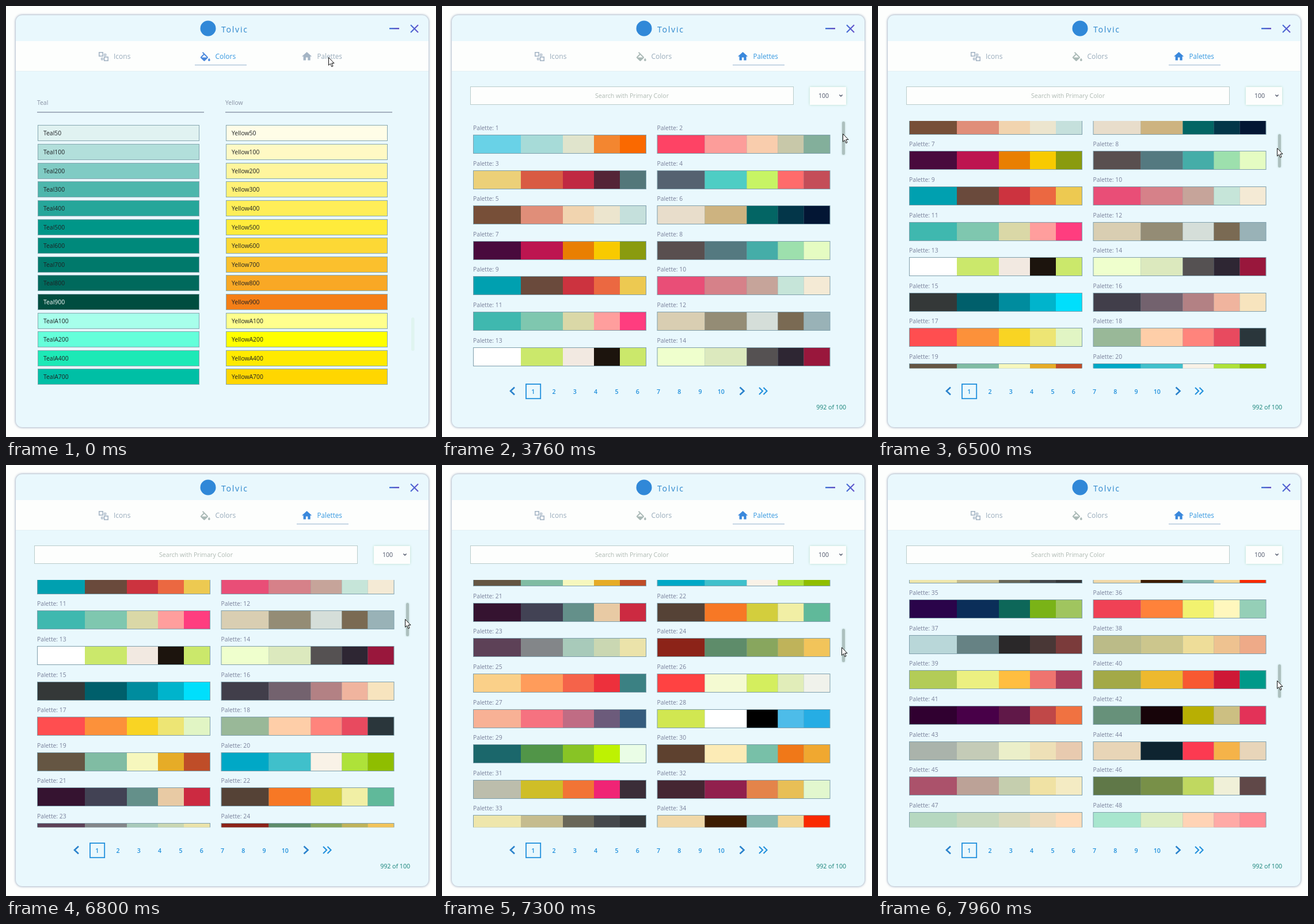
These frames come from a looping animation (747 by 750 pixels, 8000 ms). An HTML page with a canvas:

```html
<!DOCTYPE html>
<html lang="en">
<head>
<meta charset="utf-8">
<title>Palette browser</title>
<style>
html, body { margin: 0; width: 100%; height: 100%; overflow: hidden; background: #fdfefd; }
canvas { display: block; }
</style>
</head>
<body>
<canvas id="stage" width="747" height="750"></canvas>
<script>
const ctx = document.getElementById('stage').getContext('2d');
const LOOP = 8000, OPEN_AT = 760;
const FONT = '"Open Sans", "Noto Sans", sans-serif';
const BODY = '#e9f8fd', WHITE = '#fdfefd', BLUE = '#1f8fdc';
const ROW = 61.6, THUMB_RATIO = 7.12;

const teal = 'e0f2f1 b2dfdb 80cbc4 4db6ac 26a69a 009688 00897b 00796b 00695c 004d40 a7ffeb 64ffda 1de9b6 00bfa5'.split(' ');
const yellow = 'fffde7 fff9c4 fff59d fff176 ffee58 ffeb3b fdd835 fbc02d f9a825 f57f17 ffff8d ffff00 ffea00 ffd600'.split(' ');
const shades = ['50', '100', '200', '300', '400', '500', '600', '700', '800', '900', 'A100', 'A200', 'A400', 'A700'];

// Left column holds odd palettes, right column even ones.
const leftPalettes = [
  '69d2e7 a7dbd8 e0e4cc f38630 fa6900',
  'ecd078 d95b43 c02942 542437 53777a',
  '774f38 e08e79 f1d4af ece5ce c5e0dc',
  '490a3d bd1550 e97f02 f8ca00 8a9b0f',
  '00a0b0 6a4a3c cc333f eb6841 edc951',
  '3fb8af 7fc7af dad8a7 ff9e9d ff3d7f',
  'ffffff cbe86b f2e9e1 1c140d cbe86b',
  '343838 005f6b 008c9e 00b4cc 00dffc',
  'ff4e50 fc913a f9d423 ede574 e1f5c4',
  '655643 80bca3 f6f7bd e6ac27 bf4d28',
  '351330 424254 64908a e8caa4 cc2a41',
  '5d4157 838689 a8caba cad7b2 ebe3aa',
  'fad089 ff9c5b f5634a ed303c 3b8183',
  'f8b195 f67280 c06c84 6c5b7b 355c7d',
  '1b676b 519548 88c425 bef202 eafde6',
  'bcbdac cfbe27 f27435 f02475 3b2d38',
  'eee6ab c5bc8e 696758 45484b 36393b',
  '2a044a 0b2e59 0d6759 7ab317 a0c55f',
  'b9d7d9 668284 2a2829 493736 7b3b3b',
  'b3cc57 ecf081 ffbe40 ef746f ab3e5b',
  '300030 480048 601848 c04848 f07241',
  'aab3ab c4cbb7 ebefc9 eee0b7 e8caaf',
  'ab526b bca297 c5ceae f0e2a4 f4ebc3',
  'b6d8c0 c8d9bf dadabd ecdbbc fedcba'
];
const rightPalettes = [
  'fe4365 fc9d9a f9cdad c8c8a9 83af9b',
  '556270 4ecdc4 c7f464 ff6b6b c44d58',
  'e8ddcb cdb380 036564 033649 031634',
  '594f4f 547980 45ada8 9de0ad e5fcc2',
  'e94e77 d68189 c6a49a c6e5d9 f4ead5',
  'd9ceb2 948c75 d5ded9 7a6a53 99b2b7',
  'efffcd dce9be 555152 2e2633 99173c',
  '413e4a 73626e b38184 f0b49e f7e4be',
  '99b898 fecea8 ff847c e84a5f 2a363b',
  '00a8c6 40c0cb f9f2e7 aee239 8fbe00',
  '554236 f77825 d3ce3d f1efa5 60b99a',
  '8c2318 5e8c6a 88a65e bfb35a f2c45a',
  'ff4242 f4fad2 d4ee5e e1edb9 f0f2eb',
  'd1e751 ffffff 000000 4dbce9 26ade4',
  '5e412f fcebb6 78c0a8 f07818 f0a830',
  '452632 91204d e4844a e8bf56 e2f7ce',
  'f0d8a8 3d1c00 86b8b1 f2d694 fa2a00',
  'f04155 ff823a f2f26f fff7bd 95cfb7',
  'bbbb88 ccc68d eedd99 eec290 eeaa88',
  'a3a948 edb92e f85931 ce1836 009989',
  '67917a 170409 b8af03 ccbf82 e33258',
  'e8d5b7 0e2430 fc3a51 f5b349 e8d5b9',
  '607848 789048 c0d860 f0f0d8 604848',
  'a8e6ce dcedc2 ffd3b5 ffaaa6 ff8c94'
];
const edges = [0, 82, 155, 209, 254, 299];

// Keys: time, then values.
const pointer = [
  [0, 560, 89], [1150, 560, 89], [1380, 610, 150], [1610, 650, 208], [1760, 652, 209],
  [2080, 692, 220], [2290, 712, 228], [2530, 698, 226], [2570, 699, 226], [2610, 697, 226],
  [3379, 697, 226], [3380, 690, 226], [3609, 690, 226], [3610, 692, 226], [3759, 692, 226],
  [3760, 696, 222], [5069, 696, 222], [5260, 695, 233], [5759, 695, 233], [5760, 694, 235],
  [5920, 694, 241], [6149, 694, 241], [6300, 693, 246], [6499, 693, 246], [6500, 693, 247],
  [6770, 693, 265], [7030, 693, 288], [7570, 694, 346], [7960, 693, 375], [8000, 693, 375]
];
const scroll = [
  [0, 0], [5069, 0], [5070, 7], [5260, 43], [5759, 43], [5760, 52], [5920, 100], [6149, 100],
  [6150, 107], [6300, 148], [6499, 148], [6500, 156], [6770, 262], [7030, 402], [7570, 797],
  [7960, 1037], [8000, 1037]
];
const hover = [[0, 0.2], [1570, 0.2], [1610, 0.45], [2080, 0.45], [2200, 1], [8000, 1]];

function at(keys, t) {
  let i = 1;
  while (i < keys.length - 1 && keys[i][0] <= t) i++;
  const a = keys[i - 1], b = keys[i];
  const k = Math.min(1, (t - a[0]) / (b[0] - a[0]));
  return a.slice(1).map((v, n) => v + (b[n + 1] - v) * k);
}

function rect(x, y, w, h, color) {
  ctx.fillStyle = color;
  ctx.fillRect(x, y, w, h);
}
function box(x, y, w, h, color, border) {
  rect(x, y, w, h, border);
  rect(x + 1, y + 1, w - 2, h - 2, color);
}
function round(x, y, w, h, r, color) {
  ctx.fillStyle = color;
  ctx.beginPath();
  ctx.roundRect(x, y, w, h, r);
  ctx.fill();
}
function shadowed(color, blur, draw) {
  ctx.save();
  ctx.shadowColor = color;
  ctx.shadowBlur = blur;
  draw();
  ctx.restore();
}
function text(s, x, y, color, size = 10.4, weight = 400, align = 'left') {
  ctx.font = `${weight} ${size}px ${FONT}`;
  ctx.textAlign = align;
  ctx.fillStyle = color;
  ctx.fillText(s, x, y);
}
function line(points, color, width) {
  ctx.strokeStyle = color;
  ctx.lineWidth = width;
  ctx.beginPath();
  points.forEach(([x, y]) => ctx.lineTo(x, y));
  ctx.stroke();
}
function icon(path, x, y, scale, color) {
  ctx.save();
  ctx.translate(x, y);
  ctx.scale(scale, scale);
  ctx.fillStyle = color;
  ctx.fill(path);
  ctx.restore();
}

const bucket = new Path2D('M16.56 8.94L7.62 0 6.21 1.41l2.38 2.38-5.15 5.15c-.59.59-.59 1.54 0 2.12l5.5 5.5c.29.29.68.44 1.06.44s.77-.15 1.06-.44l5.5-5.5c.59-.58.59-1.53 0-2.12zM5.21 10L10 5.21 14.79 10H5.21zM19 11.5s-2 2.17-2 3.5c0 1.1.9 2 2 2s2-.9 2-2c0-1.33-2-3.5-2-3.5z');
const home = new Path2D('M10 20v-6h4v6h5v-8h3L12 3 2 12h3v8z');
const arrow = new Path2D('M.5 .5V14.2L3.6 11.3 5.8 16.6 8 15.7 5.8 10.5H10Z');

function drawWindow() {
  rect(0, 0, 747, 750, WHITE);
  shadowed('rgba(80,105,140,.75)', 4, () => round(17, 16, 717, 717, 11, BODY));
  rect(17, 61, 717, 52, WHITE);
  rect(17, 113, 717, 1, '#e2eff4');

  ctx.fillStyle = '#3088d8';
  ctx.beginPath();
  ctx.arc(351, 39, 13.5, 0, 7);
  ctx.fill();
  ctx.letterSpacing = '1.7px';
  text('Tolvic', 374, 45.5, '#2b86cd', 14.2);
  ctx.letterSpacing = '0px';

  const tint = ctx.createLinearGradient(666, 0, 717, 0);
  tint.addColorStop(0, '#3f78d8');
  tint.addColorStop(0.32, '#6048c0');
  tint.addColorStop(0.7, '#3f70d8');
  tint.addColorStop(1, '#6850c8');
  rect(666, 38, 17, 2.4, tint);
  line([[703, 33], [716, 46]], tint, 2.1);
  line([[716, 33], [703, 46]], tint, 2.1);
}

function drawTabs(open) {
  const idle = '#98abbb', live = '#3598e0';
  const gray = '#a5b5c5';
  ctx.strokeStyle = gray;
  ctx.lineWidth = 1.6;
  ctx.strokeRect(161.8, 80.8, 6.4, 6.4);
  ctx.strokeRect(170.8, 88.8, 6.4, 6.4);
  ctx.lineWidth = 1.2;
  ctx.strokeRect(170.6, 83.6, 3, 3);
  ctx.strokeRect(165.6, 90.6, 3, 3);
  icon(bucket, 335, 80, 0.94, open ? '#aab9b6' : '#4a88dc');
  icon(home, 512.3, 77.4, 0.86, open ? '#3a88dc' : '#a5b5c5');
  text('Icons', 187, 92.3, idle, 12, 500);
  text('Colors', 363.5, 92.3, open ? idle : live, 12, 500);
  text('Palettes', 540.5, 92.3, open ? live : idle, 11.7, 500);
  rect(open ? 505 : 328, 102, 90, 1.3, '#a9c1d8');
}

function drawColors() {
  [['Teal', teal, 54], ['Yellow', yellow, 381]].forEach(([name, list, x]) => {
    text(name, x, 172, '#8790a2');
    rect(x, 184, 290, 1.6, '#949fb0');
    list.forEach((hex, i) => {
      const y = Math.round(207.4 + i * 32.62);
      box(x + 1, y, 281, 28, '#' + hex, '#86a7b0');
      const white = name === 'Teal' && i === 9;
      text(name + shades[i], x + 11, y + 18, white ? '#ffffff' : '#1d2023');
    });
  });
  round(704, 542, 5.5, 58, 2.5, '#dff4f0');
}

function drawPalette(hexes, n, x, y) {
  text('Palette: ' + n, x, y - 8, '#777f99', 10.3);
  rect(x, y, 301, 33, '#7f9fac');
  hexes.split(' ').forEach((hex, i) => {
    rect(x + 1 + edges[i], y + 1, edges[i + 1] - edges[i], 31, '#' + hex);
  });
}

function drawPager() {
  line([[126, 663.5], [119, 670], [126, 676.5]], '#2a82cc', 2.6);
  line([[517.5, 663.5], [524.5, 670], [517.5, 676.5]], '#2a82cc', 2.6);
  for (const x of [551, 558.5]) line([[x, 664], [x + 6, 670], [x, 676]], BLUE, 2.1);
  ctx.strokeStyle = BLUE;
  ctx.lineWidth = 1.8;
  ctx.strokeRect(146, 658, 25.2, 25.2);
  for (let i = 0; i < 10; i++) text(i + 1, 158.3 + i * 36.28, 674.6, BLUE, 10.6, 600, 'center');
}

function drawPalettes(t) {
  box(49, 140, 562, 32, WHITE, '#b9cccb');
  text('Search with Primary Color', 330, 160.3, '#aeb9b2', 10.6, 400, 'center');
  shadowed('rgba(170,215,190,.8)', 4, () => rect(639, 141, 63, 31, WHITE));
  text('100', 654, 160.3, '#4c5468', 10.6);
  line([[690.4, 154.4], [693, 157], [695.6, 154.4]], '#4c5468', 1.4);

  const [top] = at(scroll, t);
  ctx.save();
  ctx.beginPath();
  ctx.rect(50, 200, 630, 430.5);
  ctx.clip();
  for (let i = 0; i < leftPalettes.length; i++) {
    const y = Math.round(224 + i * ROW - top);
    if (y < 160 || y > 650) continue;
    drawPalette(leftPalettes[i], i * 2 + 1, 54, y);
    drawPalette(rightPalettes[i], i * 2 + 2, 373.5, y);
  }
  ctx.restore();

  ctx.save();
  ctx.globalAlpha = at(hover, t)[0];
  shadowed('rgba(140,180,170,.6)', 3, () =>
    round(695, Math.round(201 + top / THUMB_RATIO), 5, 58, 2.5, '#adc0be'));
  ctx.restore();

  drawPager();
  text('992 of 100', 702, 702, '#128075', 10.6, 400, 'right');
}

function drawPointer(t) {
  const [x, y] = at(pointer, t).map(Math.round);
  ctx.save();
  ctx.translate(x, y);
  ctx.fillStyle = '#fff';
  ctx.fill(arrow);
  ctx.strokeStyle = '#111';
  ctx.lineWidth = 1;
  ctx.stroke(arrow);
  ctx.restore();
}

const start = performance.now();
function frame() {
  const t = (performance.now() - start) % LOOP;
  const open = t >= OPEN_AT;
  drawWindow();
  drawTabs(open);
  if (open) drawPalettes(t);
  else drawColors();
  drawPointer(t);
  requestAnimationFrame(frame);
}
frame();
</script>
</body>
</html>
```
